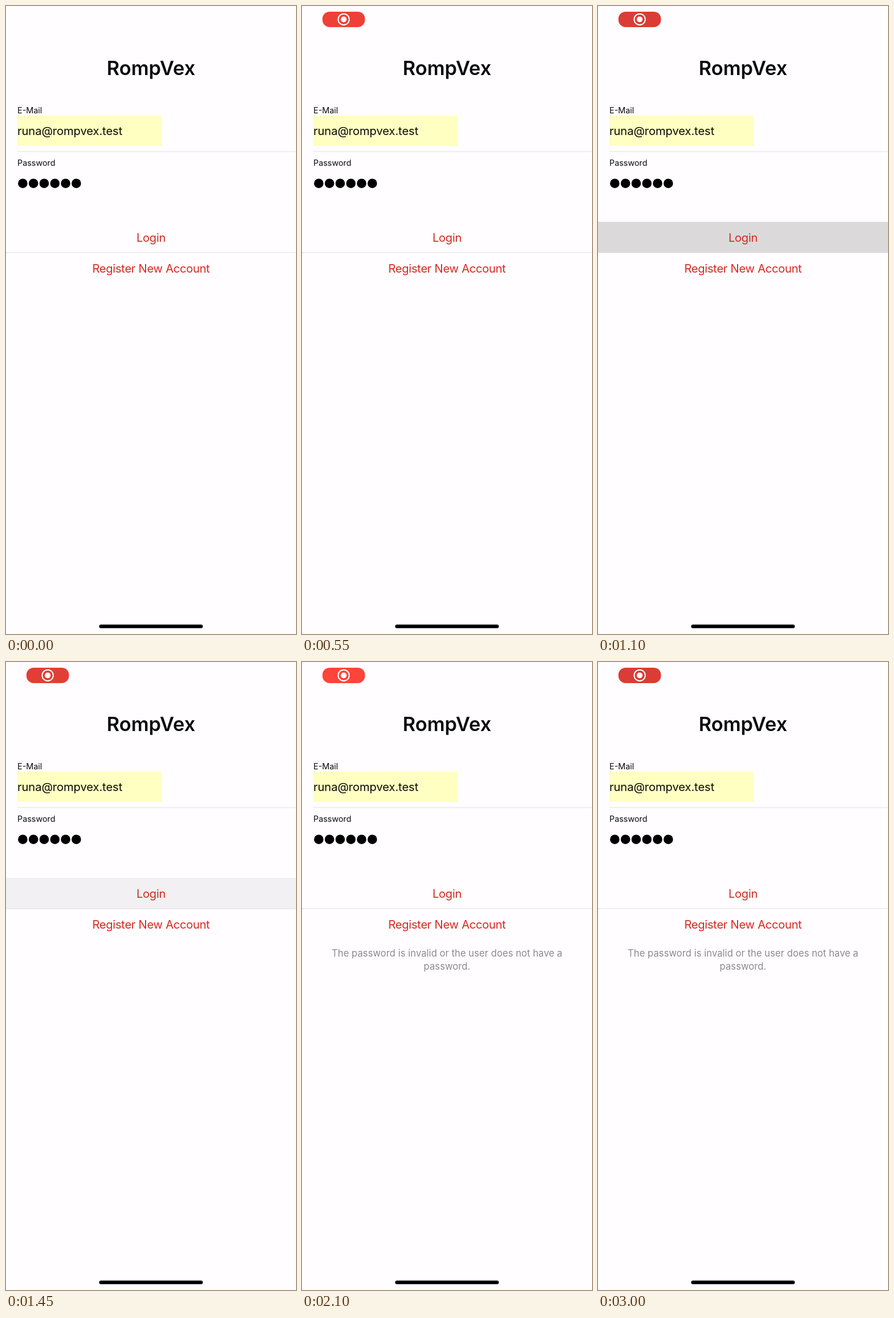
Recreate the animation shown at these times as an HTML page with a canvas. Size 509 by 1100 pixels, loop 3050 ms.

```html
<!DOCTYPE html>
<html lang="en">
<head>
<meta charset="utf-8">
<title>Login screen</title>
<style>
  html, body { margin: 0; width: 100%; height: 100%; overflow: hidden; background: #fffdff; }
  canvas { display: block; }
</style>
</head>
<body>
<canvas id="stage"></canvas>
<script>
const W = 509, H = 1100, MID = 254.5;
const LOOP = 3050, STEP = 50;
const PRESS_AT = 1100, PRESS_FADE = 550, ERROR_AT = 1700;
const PAPER = '#fffdff', INK = '#0b0b0d', RED = '#d62a22', RULE = '#e6e5ea';

const canvas = document.getElementById('stage');
const ctx = canvas.getContext('2d');
const ratio = window.devicePixelRatio || 1;
canvas.width = W * ratio;
canvas.height = H * ratio;
canvas.style.width = W + 'px';
canvas.style.height = H + 'px';

const clamp = v => Math.min(1, Math.max(0, v));
const smooth = v => v * v * (3 - 2 * v);
const mix = (a, b, k) => a.map((v, i) => Math.round(v + (b[i] - v) * k));

function rect(x, y, w, h, color) {
  ctx.fillStyle = color;
  ctx.fillRect(x, y, w, h);
}

function pill(x, y, w, h, r, color) {
  ctx.fillStyle = color;
  ctx.beginPath();
  ctx.roundRect(x, y, w, h, r);
  ctx.fill();
}

function disc(x, y, r, color) {
  ctx.fillStyle = color;
  ctx.beginPath();
  ctx.arc(x, y, r, 0, Math.PI * 2);
  ctx.fill();
}

function text(str, x, y, size, { color = INK, weight = 400, align = 'left', track = 0 } = {}) {
  ctx.font = `${weight} ${size}px Inter, sans-serif`;
  ctx.letterSpacing = track + 'px';
  ctx.textAlign = align;
  ctx.fillStyle = color;
  ctx.fillText(str, x, y);
}

// Recording badge: grows in, then pulses between bright and dark red.
function drawBadge(t) {
  const shown = smooth(clamp((t - 100) / 300));
  if (!shown) return;
  const glow = clamp(0.5 - Math.cos((t - 1050) / 1950 * Math.PI * 2));
  const scale = 0.5 + 0.5 * shown;
  ctx.save();
  ctx.globalAlpha = shown;
  ctx.translate(73.2, 23.4);
  ctx.scale(scale, scale);
  const red = t < 400 ? [255, 68, 58] : mix([219, 60, 53], [255, 68, 58], glow);
  pill(-37.3, -13.5, 74.6, 27, 12.5, `rgb(${red})`);
  ctx.strokeStyle = '#fff';
  ctx.lineWidth = 2;
  ctx.beginPath();
  ctx.arc(0, 0, 9.7, 0, Math.PI * 2);
  ctx.stroke();
  disc(0, 0, 5, '#fff');
  ctx.restore();
}

function drawForm() {
  text('RompVex', MID, 121, 34.4, { weight: 600, align: 'center' });
  text('E-Mail', 20, 188, 14.4);
  rect(19.8, 191.7, 254, 53.4, '#feffc0');
  text('runa@rompvex.test', 20, 226, 20.2, { track: -0.1 });
  rect(20, 254.4, W - 20, 1.2, RULE);
  text('Password', 20, 280, 14.4);
  for (let i = 0; i < 6; i++) disc(29.4 + 18.8 * i, 310.7, 8.3, '#000');
}

function drawButtons(t) {
  const button = { color: RED, align: 'center', track: -0.3 };
  rect(0, 431.5, W, 1.2, RULE);
  if (t >= PRESS_AT) {
    const k = clamp((t - PRESS_AT) / PRESS_FADE);
    rect(0, 378, W, 54, `rgba(220,217,219,${1 - k})`);
  }
  text('Login', MID, 412.5, 20.2, button);
  text('Register New Account', MID, 466.5, 20.2, button);
}

function drawError() {
  const note = { color: '#8b8a8f', align: 'center' };
  text('The password is invalid or the user does not have a', MID, 516, 16.7, note);
  text('password.', MID, 539, 16.7, note);
}

function draw(t) {
  ctx.setTransform(ratio, 0, 0, ratio, 0, 0);
  rect(0, 0, W, H, PAPER);
  drawBadge(t);
  drawForm();
  drawButtons(t);
  if (t >= ERROR_AT) drawError();
  pill(163.5, 1083.5, 182, 6.3, 3.1, '#000');
}

const start = performance.now();
function tick() {
  const t = (performance.now() - start) % LOOP;
  draw(Math.floor(t / STEP) * STEP);
  requestAnimationFrame(tick);
}
tick();
</script>
</body>
</html>
```
